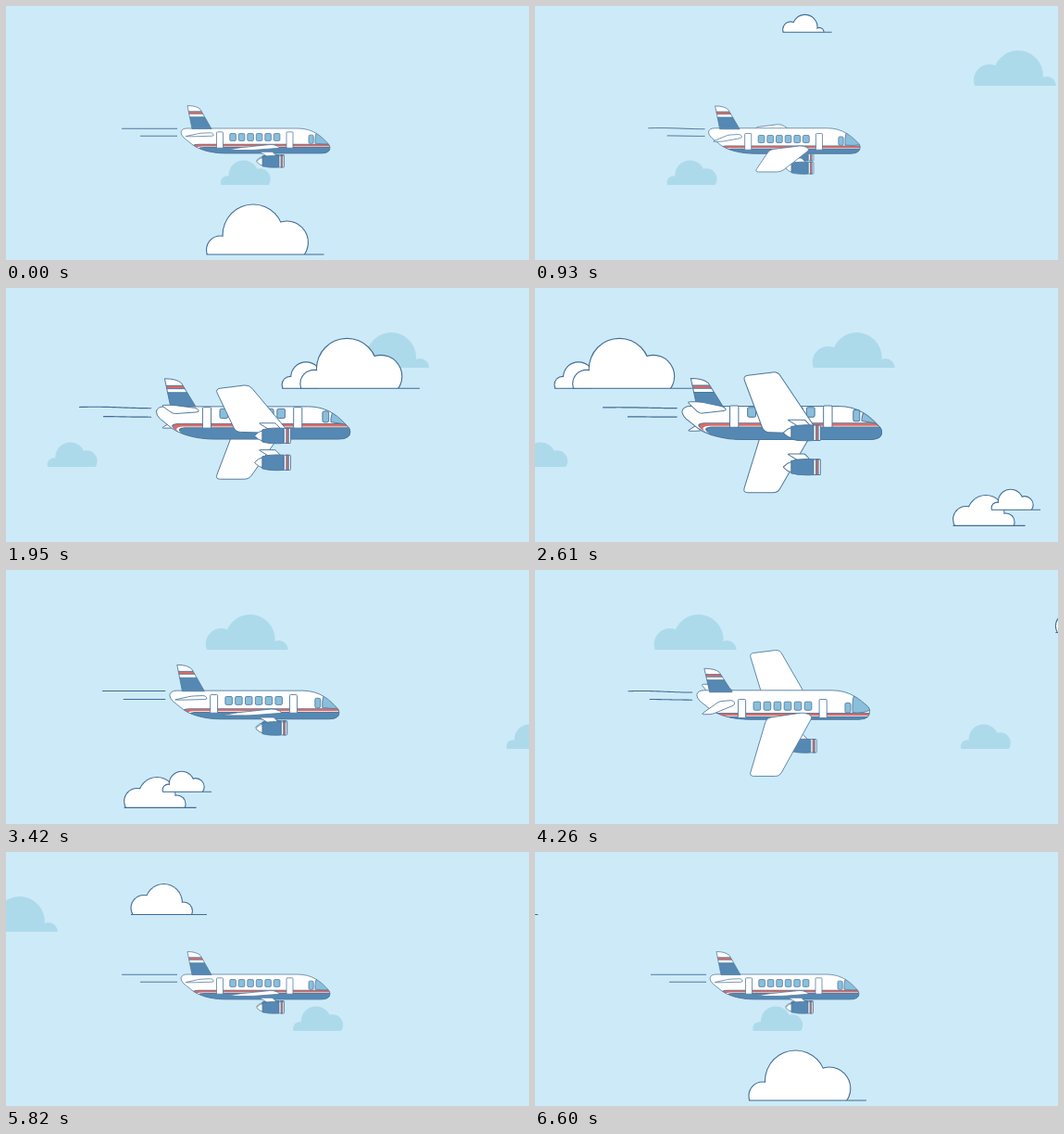
An HTML page with a canvas that plays this animation: 565x274 px, repeating every 6.63 s.

```html
<!DOCTYPE html>
<html>
<head>
<meta charset="utf-8">
<style>
html, body { margin: 0; width: 100%; height: 100%; overflow: hidden; background: #cdeaf8; }
canvas { display: block; }
</style>
</head>
<body>
<canvas id="stage" width="565" height="274"></canvas>
<script>
const c = document.getElementById('stage').getContext('2d');
const LOOP = 6630;
const SKY = '#cdeaf8', MIST = '#addaea', INK = '#416c95', EDGE = '#4e779b';
const BLUE = '#5589b4', RED = '#da6c66', GLASS = '#8abfdc', WHITE = '#fff';

// Keys are [time, value]; values ease in and out between them.
const ROLL = [[0, 2], [650, 2], [1300, 60], [2130, -52], [2480, -52], [3380, 2],
  [3800, 2], [4740, 118], [5603, 2], [LOOP, 2]];
const ZOOM = [[0, 1], [700, 1], [2300, 1.34], [2800, 1.34], [3907, 1],
  [4740, 1.42], [5531, 1], [LOOP, 1]];
const WAVE = [[0, 0], [930, -.05], [1950, -.05], [3420, 0], [4260, -.06],
  [4600, -.06], [5100, 1], [5560, 0], [LOOP, 0]];

function at(keys, t) {
  const i = keys.findIndex(k => k[0] > t);
  const [t0, a] = keys[i - 1], [t1, b] = keys[i];
  return a + (b - a) * (1 - Math.cos(Math.PI * (t - t0) / (t1 - t0))) / 2;
}

// Cloud shapes: circles [x, y, r] standing on a baseline at y = 0.
const TALL = [[15, -5, 15], [50.5, -21, 33], [87, -13, 23]];
const WIDE = [[17, -6, 17], [48, -11, 27], [79, 0, 10]];
const ROUND = [[14, -7, 14], [35.5, -13, 20], [57, -4, 9.5]];
const PUFF = [[9, -4, 9], [26, -12, 16.5]];

function cloud(shape, x, y, s, line) {
  const disc = (grow, color) => {
    c.fillStyle = color;
    for (const [cx, cy, r] of shape) {
      c.beginPath();
      c.arc(x + cx * s, y + cy * s, r * s + grow, 0, 7);
      c.fill();
    }
  };
  c.save();
  c.beginPath();
  c.rect(x - 20, 0, 220, y);
  c.clip();
  if (line) {
    disc(.5, INK);
    disc(-.6, WHITE);
  } else disc(0, MIST);
  c.restore();
  if (line) {
    c.strokeStyle = INK;
    c.lineWidth = 1.1;
    c.beginPath();
    c.moveTo(x, y);
    c.lineTo(x + line, y);
    c.stroke();
  }
}

function clouds(t) {
  const x = (x0, t0, v) => x0 - v * (t - t0);
  cloud(WIDE, x(474, 930, .1037), 86, 1);
  const drift = x(232, 0, .096);
  cloud(TALL, drift < -60 ? drift + 637 : drift, 193, .49);

  cloud(TALL, t < 3000 ? x(217, 0, .485) : x(231.4, 6600, .485), 268, 1, 127);
  cloud(WIDE, x(268, 930, .35), 28.3, .5, 53);
  const bank = x(298.6, 1950, .42);
  cloud(PUFF, bank, 108.3, 1, 40);
  cloud(TALL, bank + 19.7, 108.3, 1, 129);
  const pair = x(128, 3420, .4);
  cloud(ROUND, pair, 256.4, 1, 78);
  cloud(TALL, pair + 41.5, 239.3, .41, 53);
  cloud(ROUND, x(332.5, 5100, .274), 67.5, 1, 82);
}

function paint(path, fill) {
  c.fillStyle = fill;
  c.fill(path);
  c.stroke(path);
}

// Polygon whose corners are cut by r along each edge and rounded.
function poly(points, r) {
  const p = new Path2D(), n = points.length;
  const toward = ([x, y], [u, v]) => {
    const k = Math.min(.5, r / Math.hypot(u - x, v - y));
    return [x + (u - x) * k, y + (v - y) * k];
  };
  points.forEach((q, i) => {
    p.lineTo(...toward(q, points[(i + n - 1) % n]));
    p.quadraticCurveTo(...q, ...toward(q, points[(i + 1) % n]));
  });
  p.closePath();
  return p;
}

function box(x, y, w, h, fill, r = 1.2) {
  const p = new Path2D();
  p.roundRect(x, y, w, h, r);
  paint(p, fill);
}

function wing(a, near) {
  const tip = near ? 153.5 + a : 152.5 - a;
  const slant = Math.max(0, Math.min(3.5, (150 - tip) / 6));
  let root = [[297, 148], [254, 150]];
  if (near) root = a < 0
    ? [[298, 152], [292, 154], [255, 153]]
    : [[297, 153 + .05 * a], [289, 149 + .06 * a], [254, 152.5 + .09 * a]];
  paint(poly([[238, tip + slant], [266, tip], ...root], 4), WHITE);
}

function engine(y) {
  paint(poly([[274, y - 10.5], [288, y - 10.5], [293, y - 5], [283, y - 5]], 1), WHITE);
  paint(poly([[270.5, y], [274, y - 3], [278, y - 4.5], [278, y + 4.5], [274, y + 3]], .5), WHITE);
  paint(new Path2D(`M277 ${y - 5}Q284 ${y - 7} 295 ${y - 6.2}V${y + 6.2}Q284 ${y + 7} 277 ${y + 5}Z`), BLUE);
  box(295, y - 6.2, 5.5, 12.4, WHITE, .6);
  box(297, y - 6.2, 1.8, 12.4, RED, 0);
}

function stabilizer(a, near) {
  const d = near ? a : -a, tip = 140.3 + .24 * d;
  const top = [223, 136.5 + .08 * d], bottom = [225, 140 + .09 * d];
  const back = d < 0 ? [top, bottom, [203, 138]] : [bottom, top, [210, 137 + .09 * d]];
  paint(poly([[193, tip], [203, tip], ...back], 2.5), WHITE);
}

function fin(a) {
  const k = Math.sqrt(1 - (a / 122) ** 2), base = 132.5 + Math.max(0, .02 * a);
  const y = v => base - v * k;
  const p = new Path2D(`M201 ${y(0)}L196 ${y(25)}Q206 ${y(25)} 210 ${y(21)}L222 ${y(0)}Z`);
  c.fillStyle = WHITE;
  c.fill(p);
  c.save();
  c.clip(p);
  box(190, y(18.8), 40, 2.6 * k, RED, 0);
  box(190, y(12.8), 40, 14 * k, BLUE, 0);
  c.restore();
  c.stroke(p);
}

function fuselage(a) {
  const nose = 151 - .03 * Math.max(0, a), r = 150.5 + .07 * a;
  const p = new Path2D(`M196 132H315C332 132 341 141 347.5 ${nose - 3}Q350 ${nose - 1} 350 ${nose + 2}
    Q350 159 340 159H238C222 159 209 155 202 150L192 142Q189 139 189 136Q190 132 196 132Z`);
  c.fillStyle = WHITE;
  c.fill(p);
  c.save();
  c.clip(p);
  const belly = (x, y, fill) => {
    c.fillStyle = fill;
    c.fill(new Path2D(`M352 ${y}H${x + 8}C${x - 6} ${y} ${x + 4} ${y + 10} 242 162H352Z`));
  };
  belly(200, r - 1.8, EDGE);
  belly(201, r - 1.2, RED);
  belly(204, r + .8, WHITE);
  belly(206, r + 1.4, EDGE);
  belly(207, r + 2.1, BLUE);
  const low = 148 + .08 * a;
  paint(new Path2D(`M335 137.5L352 137V${148.7 + .02 * a}Q343 ${low + 1.2} 334 ${low}Q333.5 142 335 137.5Z`), GLASS);
  c.restore();
  c.stroke(p);
  box(327, 139 + .08 * a, 5.2, 9.2, GLASS, 1.5);
  for (let i = 0; i < 6; i++) box(241.8 + i * 9.5, 137.4 + .09 * a, 6.6, 7.8, GLASS);
  for (const x of [227.5, 303]) box(x, 135.7 + .08 * a, 7, 17.3, WHITE, .8);
}

function trail(y, length, w) {
  c.beginPath();
  for (let d = 0; d <= length; d += 2)
    c.lineTo(185 - d, y + w * 11.5 * (1 - Math.cos(Math.PI * d / 47)));
  c.stroke();
}

function plane(t) {
  const a = at(ROLL, t), s = at(ZOOM, t), w = at(WAVE, t);
  const under = a < 0, sink = .03 * Math.abs(a);
  c.save();
  c.translate(277.5, 145.5);
  c.scale(s, s);
  c.translate(-277.5, -145.5);
  c.strokeStyle = INK;
  c.lineWidth = .9;
  trail(132.2 + sink, 60, w);
  trail(140.2 + sink * .4, 40, w * .45);

  c.strokeStyle = EDGE;
  c.lineWidth = .75;
  const nearY = 167.3 + .28 * a, farY = 167.3 - .28 * a;
  if (!under) engine(farY);
  wing(a, false);
  if (under) engine(farY);
  stabilizer(a, false);
  if (under) fin(a);
  fuselage(a);
  if (!under) fin(a);
  stabilizer(a, true);
  if (!under) engine(nearY);
  wing(a, true);
  if (under) engine(nearY);
  c.restore();
}

function frame() {
  const t = performance.now() % LOOP;
  c.fillStyle = SKY;
  c.fillRect(0, 0, 565, 274);
  clouds(t);
  plane(t);
  requestAnimationFrame(frame);
}
frame();
</script>
</body>
</html>
```
